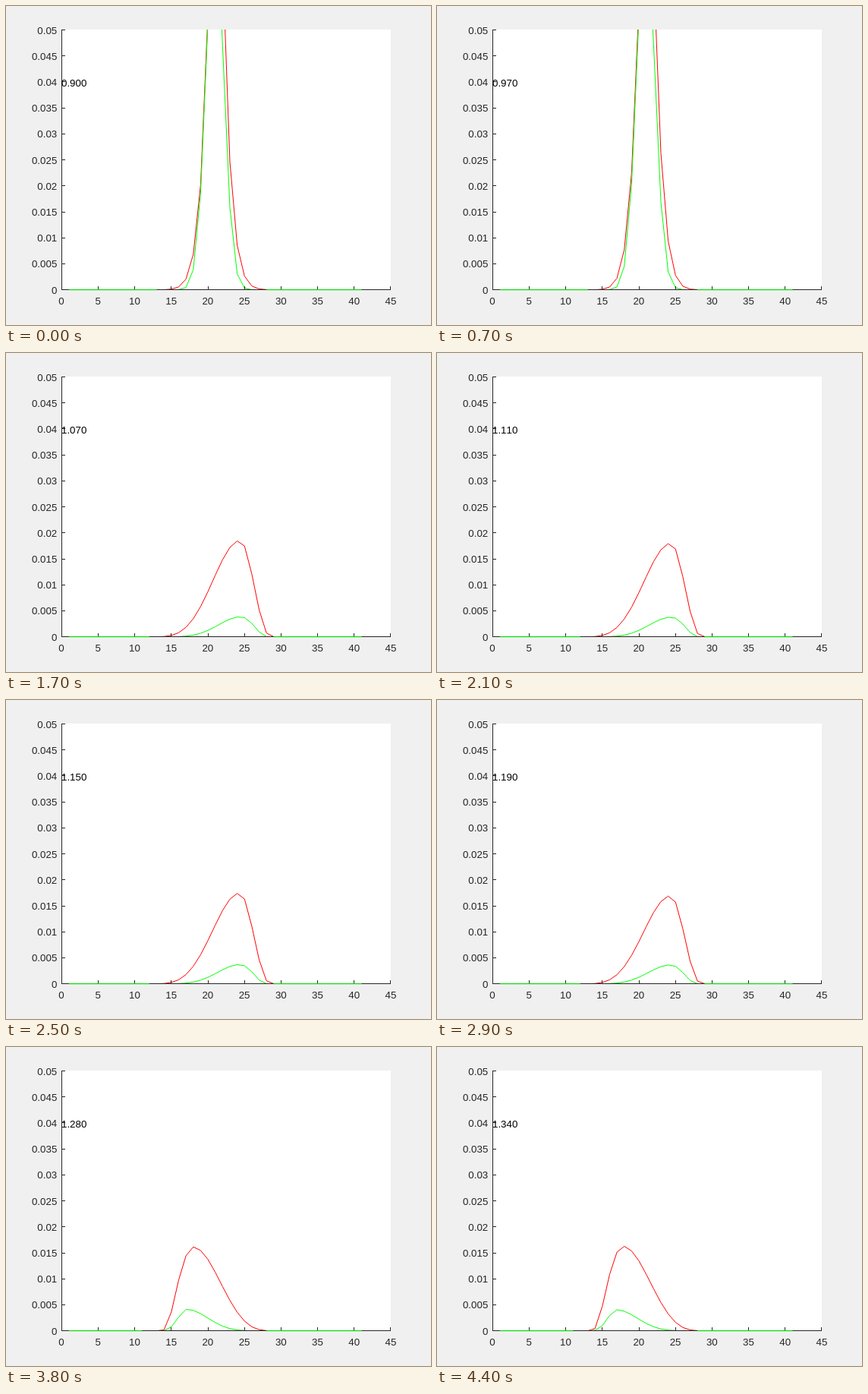
An HTML page that plays this animation: 560 px wide and 420 px high, repeating every 4500 ms.

```html
<!DOCTYPE html>
<html lang="en">
<head>
<meta charset="utf-8">
<title>Profile sweep</title>
<style>
  html, body { margin: 0; width: 100%; height: 100%; overflow: hidden; background: #f0f0f0; }
  svg { display: block; width: 560px; height: 420px; }
  text { font: 13.33px "Liberation Sans", Arial, sans-serif; font-kerning: none; fill: #262626; }
  .curve { fill: none; stroke-width: 1; stroke-linejoin: round; }
  .axis { fill: none; stroke: #262626; }
</style>
</head>
<body>
<svg viewBox="0 0 560 420">
  <defs><clipPath id="plot"><rect x="73" y="31" width="434" height="343"/></clipPath></defs>
  <rect width="560" height="420" fill="#f0f0f0"/>
  <rect x="73" y="31" width="434" height="343" fill="#fff"/>
  <g clip-path="url(#plot)">
    <path id="red" class="curve" stroke="#f00"/>
    <path id="green" class="curve" stroke="#0f0"/>
  </g>
  <path id="axis" class="axis"/>
  <path id="floor" class="curve" stroke="#0f0"/>
  <g id="labels"></g>
  <text id="value" x="73" y="106" style="fill:#000"></text>
</svg>
<script>
const STEP = 100, COUNT = 45, LAST_X = 41;
const X0 = 73.17, Y0 = 373.7, DX = 434 / 45, DY = 34.22;
const $ = id => document.getElementById(id);
const px = x => X0 + x * DX;
const lerp = (a, b, t) => a + (b - a) * t;

// Narrow symmetric peak: log height falls off linearly and quadratically.
const spike = (mid, top, slope, bend) => x => {
  const d = Math.abs(x - mid);
  return Math.exp(top - slope * d - bend * d * d);
};

// Skewed hump: each side is a Gaussian of some width, cut off at an edge.
const hump = (mid, height, left, right) => x => {
  const d = Math.abs(x - mid);
  const { width, edge } = x < mid ? left : right;
  return height * Math.exp(-((d / width) ** 2) - (d / edge) ** 6);
};

const phases = [
  {
    start: 0,
    floor: [13, 28],
    shapes(i) {
      const t = (i / 12) ** 2;
      return {
        red: spike(lerp(21.1, 21.05, t), lerp(6.82, 6.42, t), lerp(.78, .275, t), lerp(.058, .147, t)),
        green: spike(lerp(20.94, 20.9, t), lerp(6.31, 6.17, t), lerp(.21, .03, t), .28)
      };
    }
  },
  {
    start: 13,
    floor: [12, 29],
    shapes(i) {
      const t = (i - 17) / 12;
      return {
        red: hump(lerp(24.4, 24.33, t), lerp(127, 116, t),
          { width: 5.08, edge: 9.7 }, { width: 2.46, edge: 3.54 }),
        green: hump(lerp(24.5, 24.33, t), lerp(26.5, 25, t),
          { width: 4.22, edge: 9.7 }, { width: 2.4, edge: 3 })
      };
    }
  },
  {
    start: 34,
    floor: [11, 28],
    shapes(i) {
      const t = (i - 38) / 6;
      return {
        red: hump(lerp(17.95, 17.77, t), lerp(110.5, 111.5, t),
          { width: 2.85, edge: 3.4 }, { width: 5.1, edge: 8.9 }),
        green: hump(lerp(17.1, 16.92, t), lerp(28.4, 27.8, t),
          { width: 1.64, edge: 3.3 }, { width: 4, edge: 9 })
      };
    }
  }
];

function curve(shape) {
  const points = [];
  for (let x = 1; x <= LAST_X; x++) {
    points.push(`${px(x).toFixed(2)} ${(Y0 - shape(x)).toFixed(2)}`);
  }
  return "M" + points.join("L");
}

function addLabel(x, y, anchor, value) {
  const label = document.createElementNS("http://www.w3.org/2000/svg", "text");
  label.setAttribute("x", x);
  label.setAttribute("y", y);
  label.setAttribute("text-anchor", anchor);
  label.textContent = value;
  $("labels").append(label);
}

function drawAxes() {
  let d = "M73.5 31V374M73 373.5H507";
  for (let k = 0; k < 10; k++) {
    const x = px(k * 5);
    d += `M${Math.min(506, Math.floor(x)) + .5} 374v-5`;
    addLabel(x - .2, 393, "middle", k * 5);
  }
  for (let k = 0; k <= 10; k++) {
    const y = Y0 - k * DY;
    d += `M73 ${Math.floor(y) + .5}h5`;
    addLabel(67.3, Math.round(y + 5), "end", +(k * .005).toFixed(3));
  }
  $("axis").setAttribute("d", d);
}

let shown = -1;
function draw(i) {
  if (i === shown) return;
  shown = i;
  const phase = phases.filter(p => p.start <= i).pop();
  const { red, green } = phase.shapes(i);
  const [left, right] = phase.floor;
  $("red").setAttribute("d", curve(red));
  $("green").setAttribute("d", curve(green));
  $("floor").setAttribute("d", `M${px(1)} ${Y0}H${px(left)}M${px(right)} ${Y0}H${px(LAST_X)}`);
  $("value").textContent = (.9 + i / 100).toFixed(3);
}

drawAxes();
draw(0);
const begin = performance.now();
function tick() {
  draw(Math.floor((performance.now() - begin) / STEP) % COUNT);
  requestAnimationFrame(tick);
}
requestAnimationFrame(tick);
</script>
</body>
</html>
```
